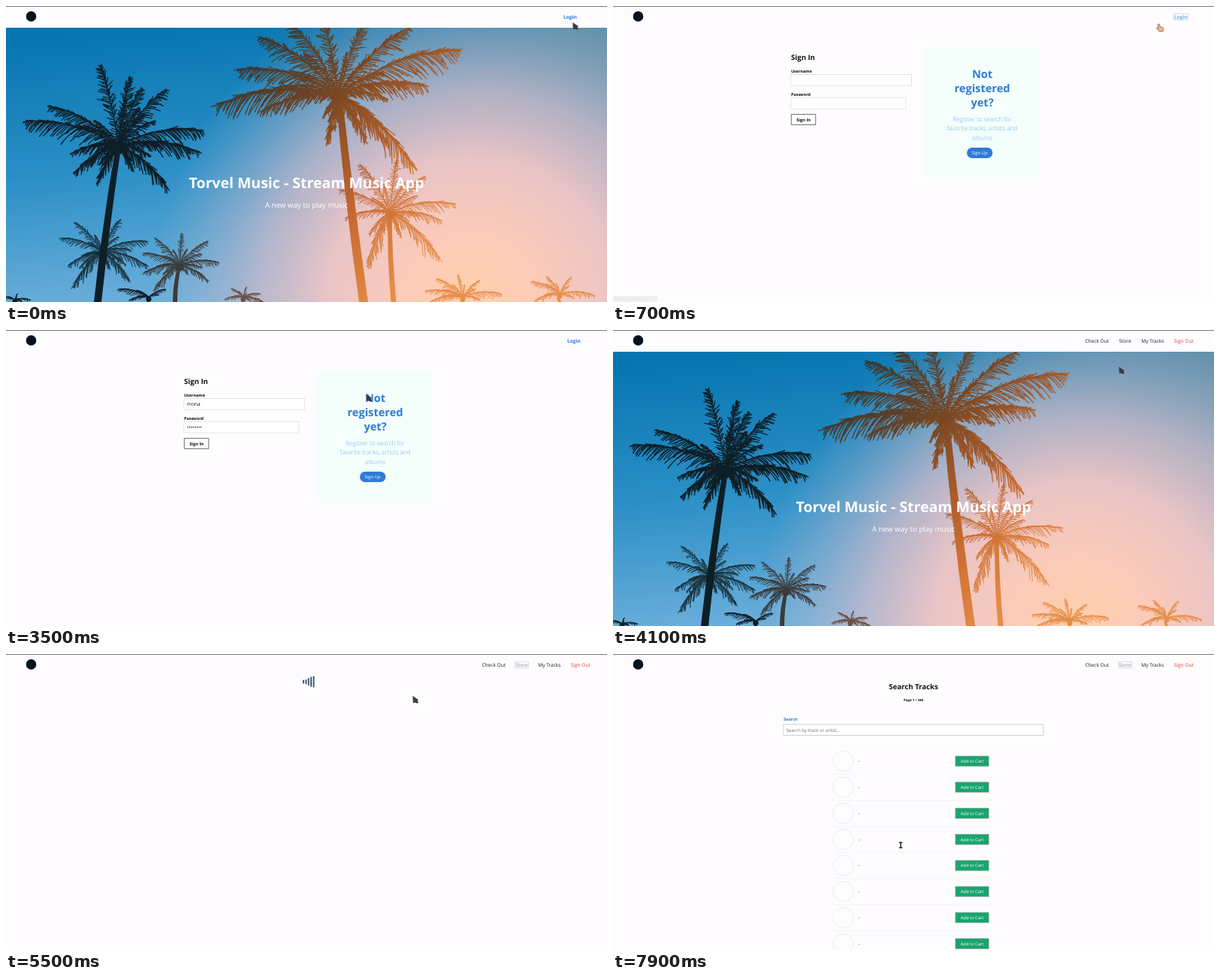
An HTML page for the animation above (8 s loop, 800 by 395 pixels).

```html
<!DOCTYPE html>
<html lang="en">
<head>
<meta charset="utf-8">
<title>Music store demo</title>
<style>
html, body { margin: 0; width: 100%; height: 100%; overflow: hidden; background: #fefcff; }
svg { display: block; width: 100vw; height: 100vh; }
text { font-family: "Open Sans", "Noto Sans", sans-serif; text-rendering: geometricPrecision; white-space: pre; }
#menu text { font-family: Inter, sans-serif; }
</style>
</head>
<body>
<svg id="stage" viewBox="0 0 800 395">
  <defs>
    <linearGradient id="sky" gradientUnits="userSpaceOnUse" x1="200" y1="25" x2="235" y2="400">
      <stop offset="0" stop-color="#0675b0"/><stop offset=".5" stop-color="#2b8fc6"/>
      <stop offset="1" stop-color="#6fb0dc"/>
    </linearGradient>
    <linearGradient id="haze" gradientUnits="userSpaceOnUse" x1="330" y1="0" x2="800" y2="0">
      <stop offset="0" stop-color="#a39a94" stop-opacity="0"/><stop offset="1" stop-color="#a39a94" stop-opacity=".5"/>
    </linearGradient>
    <radialGradient id="glow" gradientUnits="userSpaceOnUse" cx="620" cy="395" r="430">
      <stop offset="0" stop-color="#ffd0ac"/><stop offset=".2" stop-color="#fdcbb8"/>
      <stop offset=".45" stop-color="#efc6c6" stop-opacity=".95"/>
      <stop offset=".66" stop-color="#cfbccb" stop-opacity=".75"/><stop offset="1" stop-color="#9db3cc" stop-opacity="0"/>
    </radialGradient>
    <linearGradient id="warm" gradientUnits="userSpaceOnUse" x1="280" y1="60" x2="560" y2="330">
      <stop offset="0" stop-color="#26302f"/><stop offset=".4" stop-color="#7a4622"/>
      <stop offset=".75" stop-color="#cb6c30"/><stop offset="1" stop-color="#e58d48"/>
    </linearGradient>
    <clipPath id="photo"><rect y="29" width="800" height="366"/></clipPath>
  </defs>
</svg>
<script>
const stage = document.getElementById("stage");
const BLUE = "#2f7bd8", INK = "#111", COOL = "#0e1e26";
const USERS = ["guest", "bruno", "mona", "teo", "leo", "leomontes42", "tobias", "raulB", "mateo", "julian"];
const ROW = 17.6, MENU_TOP = 107;

const text = (x, y, s, size, fill = INK, weight = 400, anchor = "start", extra = "") =>
  `<text x="${x}" y="${y}" font-size="${size}" fill="${fill}" font-weight="${weight}" text-anchor="${anchor}" ${extra}>${s}</text>`;
const rect = (x, y, w, h, fill, extra = "") =>
  `<rect x="${x}" y="${y}" width="${w}" height="${h}" fill="${fill}" ${extra}/>`;
const box = (x, y, w, h, stroke, extra = "") =>
  rect(x, y, w, h, "#fff", `stroke="${stroke}" stroke-width=".7" ${extra}`);
const group = (id, body, extra = "") => `<g id="${id}" ${extra}>${body}</g>`;
const dotted = (x, w) => rect(x, 10.3, w, 8.4, "none", 'stroke="#999" stroke-width=".6" stroke-dasharray="1 .8"');

let seed = 7;
const random = () => (seed = seed * 16807 % 2147483647) / 2147483647;

// One arched rib with uneven, hanging leaflets on both sides.
function frond(cx, cy, tx, ty) {
  const dx = tx - cx, dy = ty - cy, len = Math.hypot(dx, dy);
  const mx = cx + dx * .5, my = cy + dy * .5 - len * .17;
  let d = `M${cx} ${cy}Q${mx} ${my} ${tx} ${ty}`;
  const n = Math.round(8 + len / 3.5);
  for (let i = 1; i <= n; i++) {
    const s = i / n, r = 1 - s;
    const x = r * r * cx + 2 * r * s * mx + s * s * tx;
    const y = r * r * cy + 2 * r * s * my + s * s * ty;
    const a = Math.atan2(r * (my - cy) + s * (ty - my), r * (mx - cx) + s * (tx - mx));
    for (const side of [-1, 1]) {
      const l = len * (.03 + .15 * Math.sin(Math.PI * (.1 + .84 * s))) * (.5 + .7 * random());
      const turn = a + side * (.3 + .4 * random());
      const lx = l * Math.cos(turn), ly = l * (Math.sin(turn) + .5);
      d += `M${x.toFixed(1)} ${y.toFixed(1)}q${(lx * .6).toFixed(1)} ${(ly * .4).toFixed(1)} ${lx.toFixed(1)} ${ly.toFixed(1)}`;
    }
  }
  return d;
}

function palm(color, cx, cy, width, foot, tips, leaf = 1) {
  let d = "";
  for (let i = 0; i < tips.length; i += 2) {
    const dx = tips[i] - cx, dy = tips[i + 1] - cy, short = .4 + .2 * random();
    d += frond(cx, cy, tips[i], tips[i + 1]);
    d += frond(cx, cy, cx + dx * short - dy * .2, cy + dy * short + dx * .1);
  }
  const w = width / 2;
  return `<path fill="${color}" d="M${cx - w * .7} ${cy}Q${(cx + foot) / 2 - w - 3} ${(cy + 395) / 2} ${foot - w} 395H${foot + w}Q${(cx + foot) / 2 + w - 3} ${(cy + 395) / 2} ${cx + w * .7} ${cy}Z"/>` +
    `<path fill="none" stroke="${color}" stroke-width="${leaf}" d="${d}"/>` +
    `<circle cx="${cx}" cy="${cy + 3}" r="${width * .9}" fill="${color}"/>`;
}

const hero = group("hero",
  `<g clip-path="url(#photo)">` + ["sky", "haze", "glow"].map(id => rect(0, 29, 800, 366, `url(#${id})`)).join("") +
  palm("#17303a", 128, 328, 5, 124, [74, 310, 92, 289, 152, 285, 186, 314, 186, 346, 84, 346, 90, 374, 163, 366]) +
  palm("#3b3a3a", 231, 346, 6, 225, [184, 330, 199, 310, 234, 304, 268, 314, 282, 342, 268, 366, 198, 378, 184, 356]) +
  palm("#6b5044", 316, 388, 4, 316, [292, 391, 300, 377, 320, 375, 338, 384, 344, 396]) +
  palm(COOL, 190, 388, 4, 190, [150, 378, 165, 392, 212, 378]) +
  palm(COOL, 12, 392, 4, 12, [-5, 388, 15, 384, 32, 392]) +
  palm("url(#warm)", 608, 388, 4, 608, [560, 380, 574, 364, 602, 359, 630, 366, 658, 384, 566, 394]) +
  palm("url(#warm)", 737, 384, 4, 737, [700, 368, 720, 361, 752, 362, 782, 386, 704, 393]) +
  palm("url(#warm)", 511, 276, 7, 516, [446, 246, 472, 212, 520, 206, 556, 228, 595, 264, 578, 286, 576, 336, 482, 346, 454, 282]) +
  palm(COOL, 150, 186, 10, 122, [29, 154, 60, 134, 126, 80, 165, 96, 212, 112, 260, 166, 254, 194, 214, 242, 122, 236, 92, 222, 88, 196, 180, 110], 1.3) +
  palm("url(#warm)", 443, 118, 12, 476, [283, 132, 312, 84, 340, 42, 376, 20, 420, 10, 480, 16, 535, 30, 600, 58, 558, 106, 540, 212, 428, 182, 342, 140, 505, 180], 1.3) +
  `</g>` +
  text(400, 243, "Torvel Music - Stream Music App", 19.5, "#fff", 700, "middle") +
  text(400, 268.7, "A new way to play music", 9.75, "#fff", 400, "middle"));

const menu = group("menu",
  rect(236, 107, 163, 179, "#000", 'opacity=".12"') + rect(237, MENU_TOP, 160, 177.3, "#252427") +
  rect(392.5, 109, 3, 157, "#5c5b5e", 'rx="1.5"') +
  `<g id="mark">` + rect(237, 0, 154.5, ROW, "#8ec5f3") + rect(237, ROW - .8, 154.5, .8, "#3fbf8f") + `</g>` +
  USERS.map((name, i) => {
    const y = MENU_TOP + ROW * i;
    return `<g class="user"><g fill="none" stroke="#a5a5a8" stroke-width=".8"><circle cx="244.8" cy="${y + 5.4}" r="1.4"/><path d="M240 ${y + 5.4}h3.4m-2.6 0v1.4"/></g>` +
      text(248, y + 7.7, name, 6.2, "#a3a3a6") + text(248, y + 15.3, "From this website", 5.85, "#707073") + `</g>`;
  }).join(""));

const login = group("login",
  text(237, 72, "Sign In", 9.6, INK, 700) +
  text(237, 89, "Username", 5.45, INK, 700) + box(236.9, 91.4, 160.5, 15, "#dcdcde") +
  text(237, 120, "Password", 5.45, INK, 700) + box(236.9, 122.4, 153, 14.8, "#dcdcde") +
  box(237.2, 144.7, 32.6, 13.6, "#333") + text(253.6, 153.8, "Sign In", 5.7, INK, 700, "middle") +
  text(240.8, 101.3, "", 6.6, INK, 400, "start", 'id="name"') + rect(261.6, 95, .7, 8, INK, 'id="caret"') +
  text(240.8, 132.2, "••••••••", 6.6, INK, 400, "start", 'id="secret"') +
  rect(415, 54, 153, 176, "#f4fffc") +
  ["Not", "registered", "yet?"].map((s, i) => text(491.5, 96 + 19 * i, s, 14.6, BLUE, 700, "middle")).join("") +
  ["Register to search for", "favorite tracks, artists and", "albums"]
    .map((s, i) => text(491.5, 153.6 + 12.5 * i, s, 8.2, "#69abe3", 300, "middle")).join("") +
  rect(471, 189, 34.3, 14, BLUE, 'rx="7"') + text(488, 198.2, "Sign Up", 5.9, "#fff", 400, "middle") +
  menu);

const loader = group("load", [0, 1, 2, 3, 4].map(i => rect(395 + 3.4 * i, 30, 1.9, 14, "#35566a", 'rx=".8" class="bar"')).join(""));

const store = group("store",
  text(400, 47, "Search Tracks", 9.6, INK, 700, "middle") +
  text(400, 63.4, "Page 1 / 346", 4.45, INK, 700, "middle") +
  text(227, 89, "Search", 5.6, "#1f83dc", 700) + box(227, 94, 346, 14.5, "#bbb") +
  text(230.5, 103.6, "Search by track or artist...", 6.1, "#6c6c70") +
  Array.from({ length: 8 }, (_, i) => {
    const y = 143 + 34.8 * i;
    return `<circle cx="306.5" cy="${y}" r="13.6" fill="none" stroke="#ececee"/>` +
      text(326.5, y + 2.2, "-", 7, "#444") + rect(292, y + 17.2, 216, .6, "#f1f0f2") +
      rect(455.8, y - 6.9, 44.4, 13.8, "#18a56f", 'stroke="#b9a9a4" stroke-width=".7"') +
      text(478, y + 2.1, "Add to Cart", 5.8, "#fff", 400, "middle");
  }).join(""));

const nav = rect(0, 0, 800, .9, "#66666c") + '<circle cx="33.5" cy="13.9" r="6.8" fill="#06131f"/>' +
  group("guestNav", text(742, 16.8, "Login", 6.6, BLUE, 700, "start", 'id="loginLink"') + group("loginFocus", dotted(741.5, 18.6))) +
  group("userNav", text(628.4, 16.8, "Check Out", 6.6, "#222") + text(673.4, 16.8, "Store", 6.6, "#222", 400, "start", 'id="storeLink"') +
    text(703.2, 16.8, "My Tracks", 6.6, "#222") + text(746.7, 16.8, "Sign Out", 6.6, "#dc452f") + group("storeFocus", dotted(672.9, 17.6)));

const cursor = group("cursor",
  `<path id="arrow" fill="#3a3a3d" stroke="#77777a" stroke-width=".4" d="M-3.6-5L4 .2 2.4 1.2 4 3.2 2.2 5 .2 3.8-3 4.2Z"/>` +
  `<path id="hand" fill="#f3b88f" stroke="#6b4a3a" stroke-width=".7" d="M-2.2-5Q-1-5.6-.5-4L.2-1.4 3.6-.6Q5 0 4.7 1.6L4 5H-.8L-4.4 1.2Q-4.8-.3-3.2 0L-1.8 .9-2.9-3.5Z"/>` +
  `<path id="beam" fill="none" stroke="#222" stroke-width="1.5" d="M-2.2-3.6H2.2M0-3.6V3.6M-2.2 3.6H2.2"/>`);

stage.innerHTML += hero + login + loader + store + nav +
  group("status", rect(0, 387, 59, 8, "#f0eff1") + text(2, 393, "localhost:3000/login", 5, "#e2e1e4")) + cursor;

const el = id => document.getElementById(id);
const show = (id, on) => el(id).style.display = on ? "" : "none";
const bars = document.querySelectorAll(".bar"), userRows = document.querySelectorAll(".user");

// time, x, y, pointer shape from then on
const TRACK = [
  [0, 758, 27, "arrow"], [200, 752, 18, "hand"], [500, 752, 18, "hand"], [700, 728, 29, "hand"],
  [900, 680, 42, "arrow"], [1400, 204, 92, "arrow"], [1600, 262, 100, "beam"], [1800, 262, 100, "beam"],
  [2200, 267, 152, "beam"], [2400, 267, 152, "arrow"], [2700, 488, 142, "arrow"], [3100, 255, 152, "hand"],
  [3300, 255, 152, "arrow"], [3600, 597, 60, "arrow"], [4100, 677, 54, "arrow"], [4500, 682, 30, "arrow"],
  [4700, 685, 22, "hand"], [5000, 685, 22, "hand"], [5200, 640, 36, "arrow"], [5500, 545, 61, "arrow"],
  [5700, 602, 66, "arrow"], [6300, 402, 112, "arrow"], [7200, 402, 131, "arrow"],
  [7600, 386, 230, "beam"], [7900, 383, 255, "beam"]
];

function pointer(t) {
  const i = TRACK.findLastIndex(k => k[0] <= t);
  const a = TRACK[i], b = TRACK[i + 1] || a;
  const s = b === a ? 0 : (t - a[0]) / (b[0] - a[0]);
  return { x: a[1] + (b[1] - a[1]) * s, y: a[2] + (b[2] - a[2]) * s, shape: a[3] };
}

function render(t) {
  const during = (from, to) => t >= from && t < to;
  const scene = t < 500 ? "hero" : t < 3900 ? "login" : t < 5200 ? "hero" : t < 7400 ? "load" : "store";
  for (const id of ["hero", "login", "load", "store"]) show(id, id === scene);

  const shift = scene === "login" || scene === "load" ? 5 : 0;
  show("guestNav", t < 3900);
  show("userNav", t >= 3900);
  for (const id of ["guestNav", "userNav"]) el(id).setAttribute("transform", `translate(${shift})`);
  show("loginFocus", during(500, 1600));
  el("loginLink").setAttribute("fill", during(500, 1600) ? "#6aaee6" : BLUE);
  show("storeFocus", t >= 5200);
  el("storeLink").setAttribute("fill", t >= 5200 ? "#8d8d90" : "#222");
  show("status", during(200, 900));

  const p = pointer(t);
  el("cursor").setAttribute("transform", `translate(${p.x} ${p.y})`);
  for (const id of ["arrow", "hand", "beam"]) show(id, id === p.shape);

  const open = during(1700, 2400);
  const hovered = open && p.y > MENU_TOP ? Math.floor((p.y - MENU_TOP) / ROW) : -1;
  show("menu", open);
  show("mark", hovered >= 0);
  el("mark").setAttribute("transform", `translate(0 ${MENU_TOP + ROW * hovered})`);
  userRows.forEach((row, i) => {
    const [name, note] = row.querySelectorAll("text");
    name.setAttribute("fill", i === hovered ? "#467488" : "#a3a3a6");
    note.setAttribute("fill", i === hovered ? "#3f9a8c" : "#707073");
  });
  el("name").textContent = t >= 2400 ? USERS[2] : USERS[hovered] || "";
  show("caret", during(1600, 2400));
  el("caret").setAttribute("x", 241.2 + (hovered >= 0 ? el("name").getComputedTextLength() : 0));
  show("secret", t >= 2500);

  bars.forEach((bar, i) => {
    const h = 10 + 5 * Math.cos(2 * Math.PI * (t - 5500) / 1000 - (i - 4) * .8);
    bar.setAttribute("y", 37 - h / 2);
    bar.setAttribute("height", h);
  });
}

function tick() {
  render(Math.floor(performance.now() % 8000 / 100) * 100);
  requestAnimationFrame(tick);
}
tick();
</script>
</body>
</html>
```
